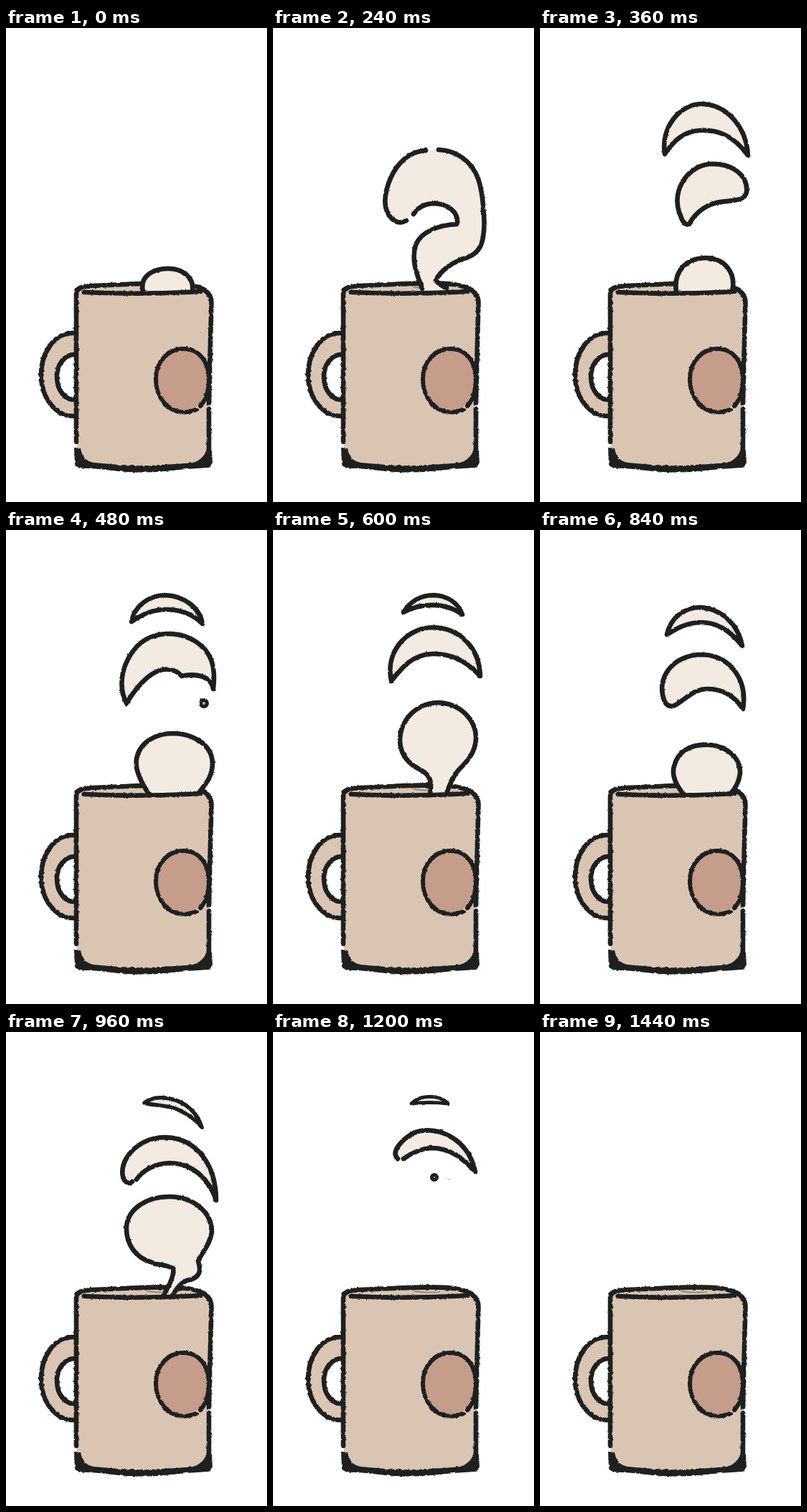
Write an HTML page that moves like this. It is 364 by 662 pixels and loops after 1920 ms.

```html
<!DOCTYPE html>
<html lang="en">
<head>
<meta charset="utf-8">
<title>Steaming mug</title>
<style>
  html, body { margin: 0; width: 100%; height: 100%; overflow: hidden; background: #fff; }
  svg { display: block; width: 100%; height: 100%; }
  path, ellipse { stroke: #1e2020; stroke-width: 6.6; stroke-linecap: round; stroke-linejoin: round; }
  .mug { fill: #dac5b3; }
  .steam { fill: #f3ebe1; }
  .fill { stroke: none; }
  .line { fill: none; }
  .ink { fill: #1e2020; stroke: none; }
  .dot { fill: #b9b5ae; stroke-width: 5; }

  /* Each pose holds for 120 ms of the 1920 ms loop. */
  .pose { visibility: hidden; animation: show 1920ms step-end calc(var(--i) * 120ms) infinite; }
  @keyframes show {
    0% { visibility: visible; }
    6.25%, 100% { visibility: hidden; }
  }
</style>
</head>
<body>
<svg viewBox="0 0 364 662">
  <defs>
    <filter id="rough" filterUnits="userSpaceOnUse" x="0" y="0" width="364" height="662" color-interpolation-filters="sRGB">
      <feTurbulence type="fractalNoise" baseFrequency=".22" numOctaves="2" seed="4"/>
      <feDisplacementMap in="SourceGraphic" scale="3" xChannelSelector="R" yChannelSelector="G"/>
    </filter>
    <filter id="soft" filterUnits="userSpaceOnUse" x="0" y="0" width="364" height="662" color-interpolation-filters="sRGB">
      <feTurbulence type="fractalNoise" baseFrequency=".18" numOctaves="2" seed="9"/>
      <feDisplacementMap in="SourceGraphic" scale="2.4" xChannelSelector="R" yChannelSelector="G"/>
    </filter>
  </defs>

  <g class="mug" filter="url(#rough)">
    <path class="fill" d="M97 427C66 424 49 456 49 485C49 516 69 543 97 541V519C82 520 71 505 71 487C71 469 83 455 97 456Z"/>
    <path class="line" d="M96 426C65 425 49 456 49 485C49 516 69 543 96 542"/>
    <path class="line" d="M96 456C82 456 71 469 71 487C71 505 82 520 96 519"/>
    <path class="fill" d="M98 372C98 362 106 361 122 360L166 358C205 356 238 356 252 358C272 361 288 368 287 384L284 525V608L200 614L99 609Z"/>
    <path class="line" d="M98 578V372C98 362 106 361 122 360L166 358C205 356 238 356 252 358C272 361 287 368 286.500 384L285 440L283 524M283 532L283 592"/>
    <path class="ink" d="M95 586L104 587C106 599 112 605 122 607C150 609 165 612 200 611C225 610 250 608 262 607C272 603 278 596 280 588L287 590L288 608Q287 613 282 614C262 615 240 617 222 619C190 622 160 620 140 617L118 615Q96 615 96 609Z"/>
    <ellipse class="fill" cx="246" cy="492" rx="36" ry="44" style="fill:#c59d8a"/>
    <path class="line" style="stroke-width:6" d="M265 533C232 546 209 520 209 490C209 466 226 448 248 448C270 448 283 467 283 491C283 506 279 519 271 528"/>
    <path class="line" style="stroke:#928a7a;stroke-width:2" d="M197 362Q214 365 232 363"/>
  </g>

  <g class="steam" filter="url(#soft)">
    <g class="pose" style="--i:0">
      <path d="M191 368C186 345 207 336 226 336C246 336 263 348 260 368"/>
    </g>

    <g class="pose" style="--i:1">
      <path d="M205 366C206 352 200 342 190 332C170 318 166 290 176 268C188 244 215 236 238 240C270 246 290 270 286 296C284 316 262 326 250 338C243 346 240 356 240 366"/>
    </g>

    <g class="pose" style="--i:2">
      <path class="fill" d="M208 366C202 347 192 326 199 303C206 285 230 275 257 274C259 256 243 245 223 245C210 246 201 252 196 260L186 268C176 275 166 270 160 256C153 240 161 212 174 194C186 178 200 171 222 171C250 169 276 184 286 210C292 230 293 250 294 272C295 305 285 315 272 320C250 326 233 340 227 352L240 366Z"/>
      <path class="line" d="M208 364C202 347 192 326 199 303C206 285 230 275 257 274C259 256 243 245 223 245C210 246 201 252 196 260M186 269C176 275 165 270 159 256C152 240 160 212 173 194C185 178 200 172 213 171M231 170C254 171 276 184 286 210C290 222 292 236 293 247M293 252C295 265 295 280 293 292C291 306 285 315 272 320C250 326 233 340 227 352Q232 359 242 363"/>
    </g>

    <g class="pose" style="--i:3">
      <path d="M174 176C168 140 194 106 226 106C262 107 288 140 290 178C270 150 248 142 224 143C200 144 186 158 174 176Z"/>
      <path d="M196 262C182 232 202 194 236 190C268 188 291 206 288 230C284 244 262 240 246 244C228 248 214 262 208 274C203 276 198 270 196 262Z"/>
      <path d="M190 368C186 338 205 322 230 321C258 321 274 342 268 368"/>
    </g>

    <g class="pose" style="--i:4">
      <path d="M175 128C179 106 200 91 222 91C248 92 270 108 274 131C260 117 242 111 224 111C204 111 190 118 175 128Z"/>
      <path d="M168 242C154 213 164 182 184 161C206 141 240 140 265 156C286 170 293 190 289 222C287 206 268 199 245 204Q242 201 238 198C215 186 190 206 168 242Z"/>
      <ellipse class="dot" cx="276" cy="242" rx="4.5" ry="4.5"/>
      <path d="M200 370C187 350 180 335 182 320C186 296 209 284 234 284C262 285 287 300 288 325C288 343 281 352 268 368"/>
    </g>

    <g class="pose" style="--i:5">
      <path d="M182 115C192 98 208 91 224 91C244 92 258 102 264 118C242 101 206 101 182 115Z"/>
      <path d="M165 211C156 170 186 136 224 136C262 137 288 166 289 204C270 183 248 172 222 173C194 174 180 192 165 211Z"/>
      <path d="M219 368C222 352 220 342 204 334C180 322 172 300 180 276C190 252 210 241 232 241C262 243 284 266 283 292C282 312 270 324 258 336C250 346 246 356 242 368"/>
    </g>

    <g class="pose" style="--i:6">
      <path class="line" d="M190 102C204 87 235 86 251 104"/>
      <path class="fill" d="M164 172C163 150 190 127 219 127C254 127 284 150 287 185C270 162 247 149 221 149C196 149 180 157 167 168Z"/>
      <path class="line" d="M163 179C161 150 190 127 219 127C254 127 284 150 287 185C270 162 247 149 221 149C196 149 180 157 167 168"/>
      <path d="M190 279C180 269 177 248 182 232C189 214 208 205 228 205C252 205 269 218 275 238C278 256 275 272 271 281Q256 287 242 281Q242 268 236 261C224 277 208 285 190 279Z"/>
      <ellipse class="dot" cx="225" cy="321" rx="5.5" ry="4.2" transform="rotate(-45 225 321)"/>
    </g>

    <g class="pose" style="--i:7">
      <path d="M177 146C182 122 202 108 224 108C252 110 276 130 282 162C264 139 246 129 224 129C202 130 190 138 177 146Z"/>
      <path d="M174 240C160 206 186 174 226 174C264 175 290 208 283 250C270 230 254 222 234 222C212 222 200 240 186 246Q178 247 174 240Z"/>
      <path d="M201 370C186 352 184 340 187 330C192 308 212 299 234 300C260 301 280 318 279 340Q277 356 266 368"/>
    </g>

    <g class="pose" style="--i:8">
      <path style="stroke-width:5.5" d="M193 99C215 82 262 95 273 133C263 120 251 114 239 108C222 101 206 103 193 99Z"/>
      <path class="fill" d="M171 211C160 208 160 190 168 176C180 157 200 147 222 147C266 148 293 186 293 235C283 204 259 183 228 183C206 184 190 194 180 207Z"/>
      <path class="line" d="M171 211C160 208 160 190 168 176C180 157 200 147 222 147C266 148 293 186 293 235C283 204 259 183 228 183C206 184 190 194 182 206M176 209L174 211"/>
      <path class="fill" d="M206 323C181 316 167 296 168 272C170 246 198 229 230 230C264 231 288 254 287 280C284 298 273 308 268 320C272 332 272 344 252 347C241 352 236 362 230 372L219 370C228 353 234 340 233 329Z"/>
      <path class="line" d="M204 322C181 316 167 296 168 272C170 246 198 229 230 230C264 231 288 254 287 280C284 298 273 308 268 320C272 332 272 344 252 347C241 352 236 362 230 371M208 324Q222 325 233 330C235 340 228 353 219 369"/>
    </g>

    <g class="pose" style="--i:9">
      <path d="M190 102C208 86 242 86 258 112C236 101 214 98 190 102Z"/>
      <path d="M168 178C164 146 192 121 222 121C258 122 284 150 288 188C270 162 248 151 224 151C198 152 182 162 168 178Z"/>
      <path d="M180 246C168 214 190 184 226 184C260 185 284 210 279 244Q272 256 260 249C250 232 222 230 210 243Q192 261 180 246Z"/>
      <ellipse class="dot" cx="228" cy="284" rx="5" ry="4"/>
    </g>

    <g class="pose" style="--i:10">
      <path style="stroke-width:5" d="M193 100C206 87 232 87 244 100Q218 97 193 100Z"/>
      <path class="fill" d="M174 178C164 168 178 152 194 142C224 128 272 146 283 195C264 176 248 162 220 162C204 163 192 170 181 179Z"/>
      <path class="line" d="M174 177C164 168 178 152 194 142C224 128 272 146 282 195C264 176 248 162 220 162C204 163 192 170 182 177"/>
      <ellipse class="dot" cx="225" cy="203" rx="3.6" ry="3.4"/>
      <path class="line" style="stroke-width:1.2" d="M241 205h.1M245 206h.1"/>
    </g>

    <g class="pose" style="--i:11">
      <path d="M180 136C188 112 206 102 224 102C248 103 268 120 274 146C258 128 242 120 222 120C204 120 192 127 180 136Z"/>
    </g>
  </g>

  <path class="line" filter="url(#rough)" d="M109 369Q190 373 271 368"/>
</svg>
</body>
</html>
```
